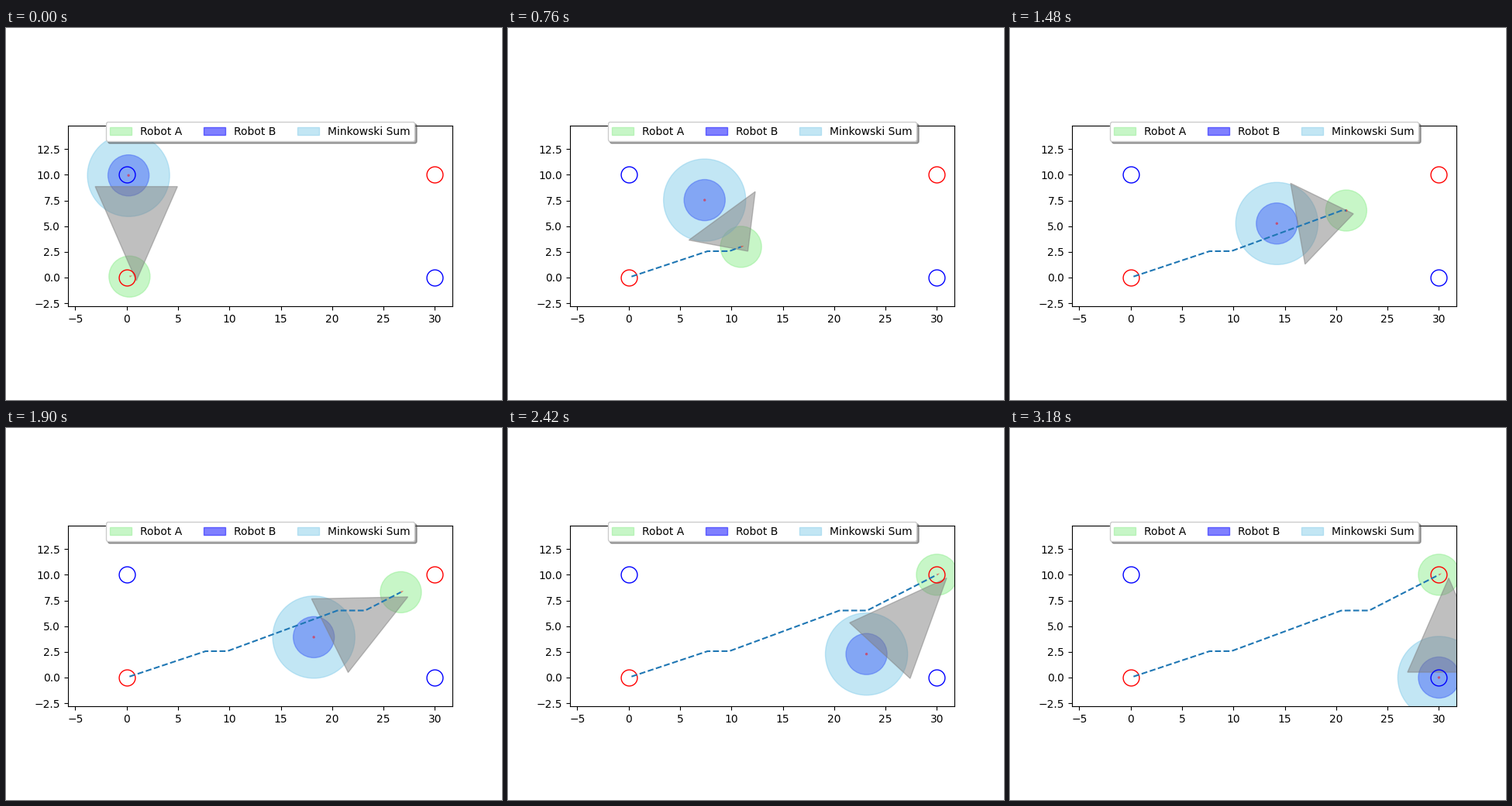
Animation, 640 px wide and 480 px high, one loop 6000 ms. Source, as a matplotlib script:

```python
import numpy as np
import matplotlib.pyplot as plt
from matplotlib.animation import FuncAnimation
from matplotlib.patches import Circle, Polygon

DT = 0.2
RADIUS = 2.0
FRAMES, INTERVAL = 300, 20

START_A, GOAL_A = np.array([0.0, 0.0]), np.array([30.0, 10.0])
START_B, GOAL_B = np.array([0.0, 10.0]), np.array([30.0, 0.0])
SPAN_B = np.hypot(*(GOAL_B - START_B))
VEL_B = (GOAL_B - START_B) / SPAN_B

# Robot A: step number, x, y at each turn of its route
ROUTE = np.array([
    (0, 0, 0),
    (27, 7.684, 2.561),
    (35, 9.81, 2.57),
    (72, 20.23, 6.41),
    (73, 20.48, 6.51),
    (75, 20.98, 6.52),
    (83, 23.21, 6.52),
    (108.4, 30, 10),
])
LAST_STEP_A = 108


def pos_a(k):
    t, x, y = ROUTE.T
    return np.array([np.interp(k, t, x), np.interp(k, t, y)])


def vel_a(k):
    k = min(k, LAST_STEP_A)
    return (pos_a(k) - pos_a(k - 1)) / DT


def pos_b(k):
    return START_B + VEL_B * min(k * DT, SPAN_B)


def velocity_obstacle(a, b):
    """Cone from A that touches the Minkowski disc, shifted by B's velocity."""
    rel = b - a
    dist = np.hypot(*rel)
    ahead = rel / dist
    side = np.array([-ahead[1], ahead[0]]) * 2 * RADIUS
    apex = a + VEL_B
    base = apex + ahead * np.sqrt(dist**2 - 4 * RADIUS**2)
    return np.array([apex, base + side, base - side])


fig, ax = plt.subplots(figsize=(6.4, 4.8), dpi=100)
ax.set_xlim(-5.7, 31.7)
ax.set_ylim(-2.8, 14.8)
ax.set_aspect("equal")

for color, ends in (("red", (START_A, GOAL_A)), ("blue", (START_B, GOAL_B))):
    for end in ends:
        ax.plot(*end, "o", ms=15, mfc="none", mec=color)


def disc(center, radius, color, label):
    return ax.add_patch(Circle(center, radius, color=color, alpha=0.5, label=label))


robot_a = disc(START_A, RADIUS, "lightgreen", "Robot A")
robot_b = disc(START_B, RADIUS, "blue", "Robot B")
minkowski = disc(START_B, 2 * RADIUS, "skyblue", "Minkowski Sum")
cone = ax.add_patch(Polygon(velocity_obstacle(START_A, START_B), color="gray", alpha=0.5))
arrows = ax.quiver([0, 0], [0, 10], [1, 1], [0, 0], color="red", alpha=0.5,
                   angles="xy", scale_units="xy", scale=1 / DT, zorder=1)
trail, = ax.plot([], [], "--", color="C0")

ax.legend(handles=[robot_a, robot_b, minkowski], loc="upper center",
          bbox_to_anchor=(0.5, 1.05), ncol=3, fancybox=True, shadow=True)


def update(frame):
    step = frame + 1
    a, b = pos_a(step), pos_b(step)
    robot_a.center = a
    robot_b.center = b
    minkowski.center = b
    cone.set_xy(velocity_obstacle(pos_a(frame), pos_b(frame)))
    arrows.set_offsets([a, b])
    arrows.set_UVC(*np.array([vel_a(step), VEL_B]).T)
    trail.set_data(*np.array([pos_a(k) for k in range(1, step + 1)]).T)
    return robot_a, robot_b, minkowski, cone, arrows, trail


anim = FuncAnimation(fig, update, frames=FRAMES, interval=INTERVAL,
                     init_func=lambda: update(0), repeat=True, repeat_delay=0)
plt.show()
```
